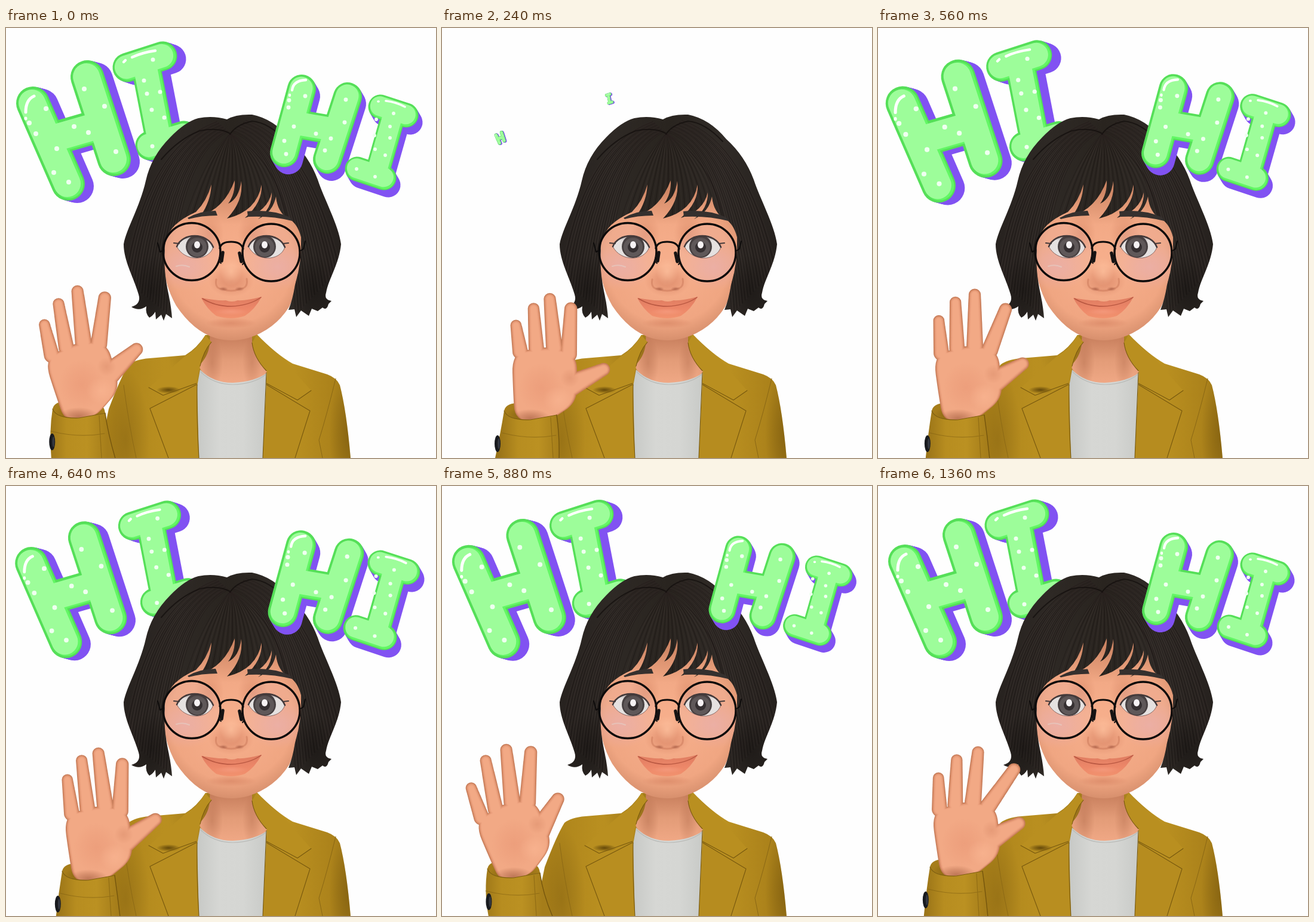
Write an HTML page with a canvas that moves like this. It is 720 px wide and 720 px high and loops after 1440 ms.

```html
<!DOCTYPE html>
<html lang="en">
<head>
<meta charset="utf-8">
<title>Hi</title>
<style>
html, body { margin: 0; width: 100%; height: 100%; overflow: hidden; background: #fefefe; }
canvas { display: block; width: 100vmin; height: 100vmin; }
</style>
</head>
<body>
<canvas id="stage" width="720" height="720"></canvas>
<script>
const ctx = document.getElementById('stage').getContext('2d');
const LOOP = 1440, STEP = 80;
const lerp = (a, b, k) => a + (b - a) * k;

// Linear interpolation through rows of [time, ...values].
function sample(keys, t) {
  let i = 0;
  while (i < keys.length - 2 && t >= keys[i + 1][0]) i++;
  const a = keys[i], b = keys[i + 1];
  const k = Math.max(0, Math.min(1, (t - a[0]) / (b[0] - a[0])));
  return a.slice(1).map((v, n) => lerp(v, b[n + 1], k));
}

function fill(shape, color) {
  ctx.fillStyle = color;
  ctx.fill(typeof shape === 'string' ? new Path2D(shape) : shape);
}

function line(shape, color, width = 1) {
  ctx.strokeStyle = color;
  ctx.lineWidth = width;
  ctx.stroke(typeof shape === 'string' ? new Path2D(shape) : shape);
}

function disc(x, y, rx, ry, color) {
  ctx.beginPath();
  ctx.ellipse(x, y, rx, ry, 0, 0, 7);
  ctx.fillStyle = color;
  ctx.fill();
}

function glow(x, y, rx, ry, rgb, alpha) {
  ctx.save();
  ctx.translate(x, y);
  ctx.scale(rx, ry);
  const g = ctx.createRadialGradient(0, 0, 0, 0, 0, 1);
  g.addColorStop(0, `rgba(${rgb},${alpha})`);
  g.addColorStop(0.5, `rgba(${rgb},${alpha * 0.55})`);
  g.addColorStop(1, `rgba(${rgb},0)`);
  disc(0, 0, 1, 1, g);
  ctx.restore();
}

function within(shape, paint) {
  ctx.save();
  ctx.clip(shape);
  paint();
  ctx.restore();
}

function linear(x0, y0, x1, y1, ...colors) {
  const g = ctx.createLinearGradient(x0, y0, x1, y1);
  colors.forEach((c, i) => g.addColorStop(i / (colors.length - 1), c));
  return g;
}

// ---- Bubble letters -------------------------------------------------
// cast is the direction of the purple side
const letters = {
  leftH: {
    center: [122, 173], width: 56, from: [-22, 11], cast: [15, 4],
    body: 'M47 126L106 261M138 82L183 220M80 186L160 163',
    shine: 'M35 141Q35 120 49 114M35 151L35 152',
    dots: [[41, 159], [69, 135], [52, 177], [87, 202], [82, 242], [107, 258], [116, 165], [133, 102], [167, 131], [140, 175], [186, 207]]
  },
  leftI: {
    center: [242, 120], width: 49, from: [39, -2], cast: [15, 5],
    body: 'M205 66L264 47M235 58L259 182M243 197L300 180',
    shine: 'M213 49Q230 41 252 38M199 57L202 54',
    dots: [[248, 53], [238, 110], [260, 107], [246, 137], [267, 150], [247, 198], [233, 88]]
  },
  rightH: {
    center: [522, 161], width: 48, from: [2, 7], cast: [7, 12],
    body: 'M497 102L468 209M574 115L540 220M485 160L555 172',
    shine: 'M481 104Q483 88 504 87M477 112L477 113',
    dots: [[476, 121], [475, 133], [503, 114], [484, 165], [468, 189], [471, 211], [521, 177], [571, 120], [569, 158], [546, 185], [536, 205]]
  },
  rightI: {
    center: [632, 198], width: 41, from: [1, 1], cast: [7, 12],
    body: 'M629 132L672 146M651 145L624 240M590 236L635 251',
    shine: 'M638 122Q655 124 670 132M625 123L626 123',
    dots: [[651, 143], [622, 153], [645, 165], [619, 180], [645, 184], [620, 203], [637, 213], [589, 236], [620, 249]]
  }
};

// age, scale, drift from the resting place
const popKeys = [
  [0, 0.1, 1], [80, 0.6, 0.5], [160, 1.015, 0.06], [240, 1.045, 0], [320, 1.02, 0.1],
  [400, 0.975, 0.2], [480, 0.945, 0.12], [560, 0.97, 0.06], [640, 0.995, 0.03], [720, 1, 0]
];

function drawLetter({ center: [cx, cy], width, body, shine, dots, from, cast }, age) {
  if (age < 0) return;
  const [scale, drift] = sample(popKeys, age);
  const shape = new Path2D(body);
  const layer = (k, color, w) => {
    ctx.save();
    ctx.translate(cast[0] * k, cast[1] * k);
    line(shape, color, w);
    ctx.restore();
  };
  ctx.save();
  ctx.translate(cx - 2 + from[0] * drift, cy + from[1] * drift);
  ctx.scale(scale, scale);
  ctx.translate(-cx, -cy);
  const depth = width / 56;
  for (let i = 1; i <= 6; i++) layer(i / 6, '#8152f2', width);
  layer(0, '#55df58', width);
  layer(0.1, '#63f765', width - 8 * depth);
  layer(-0.1, '#9dfd9a', width - 11 * depth);
  dots.forEach(([x, y]) => disc(x, y, 4 * depth, 4 * depth, '#effff0'));
  line(shine, '#fff', 5 * depth);
  ctx.restore();
}

function drawWord(names, start, t) {
  names.forEach(n => drawLetter(letters[n], t === 0 ? LOOP : t - start));
}

// ---- Clothes ----------------------------------------------------------
const jacket = new Path2D('M334 514Q320 536 300 548L240 553Q216 555 205 564Q192 585 172 638L155 720H577Q570 640 559 598Q554 586 538 580L480 562Q452 546 420 513Z');
const neck = new Path2D('M342 500L341 530Q338 552 322 566Q345 604 380 602Q420 602 438 574Q417 555 412 525V500Z');

function drawBody() {
  fill(jacket, linear(160, 0, 577, 0, '#a98019', '#b98f20', '#b48b1f', '#bb9121', '#a57c18'));
  within(jacket, () => {
    glow(365, 545, 95, 60, '80,55,5', 0.35);
    glow(200, 690, 40, 120, '90,62,8', 0.25);
    glow(575, 680, 34, 110, '80,55,5', 0.35);
  });
  fill(neck, linear(0, 518, 0, 595, '#c9805e', '#e39c78', '#f0a885'));
  glow(345, 560, 18, 45, '150,80,50', 0.3);
  glow(412, 560, 16, 45, '150,80,50', 0.25);
  fill('M325 572Q346 594 380 594Q418 592 437 577L430 720H323L320 600Z',
    linear(318, 0, 437, 0, '#c6c8c5', '#d6d7d4', '#d5d6d3', '#c8cac7'));
  line('M326 576Q348 597 380 597Q416 596 435 580', '#b9bbb8', 1.2);

  fill('M334 514Q320 538 300 549L239 602L263 615L319 594L326 562Q331 540 344 526Z', '#b98f20');
  fill('M420 513Q444 540 462 551L511 607L488 623L436 594L437 575Q415 552 412 527Z', '#b98f20');
  fill('M319 597L241 637L272 720H323Q320 650 319 597Z', '#b88e20');
  fill('M436 597L509 641L484 720H430Z', '#b68c1f');
  glow(272, 606, 20, 6, '65,43,0', 0.7);
  const seams = ['M239 602L263 615L319 595', 'M319 597L241 637L272 720', 'M511 607L488 623L436 595',
    'M436 597L509 641L484 720', 'M320 597Q319 650 323 720', 'M436 577L430 720',
    'M325 566Q331 540 344 526', 'M436 574Q415 552 412 527'];
  seams.forEach(s => line(s, '#77580e', 1.1));
  line('M552 587Q538 645 524 690L530 720', '#8a6714');
  line('M197 598Q205 660 218 720', '#8d6a15');
}

// ---- Head -------------------------------------------------------------
const face = new Path2D('M262 300V385Q265 430 285 465Q313 507 350 519Q378 527 406 519Q450 505 474 467Q492 430 495 385V300Q450 230 378 232Q300 232 262 300Z');
const hair = new Path2D('M370 153Q346 146 322 151Q300 157 275 183Q243 215 234 256C224 300 202 335 197 362C197 390 214 418 222 446Q227 462 210 467Q223 475 235 466Q233 478 240 485Q246 482 250 475L251 488L260 480L264 490L268 479L278 486Q277 470 273 450Q263 405 266 374Q264 350 283 330Q296 318 318 308Q336 290 344 262Q343 290 326 314Q365 303 383 255Q384 278 372 294Q390 286 394 256Q398 290 370 319Q420 307 428 262Q430 292 400 318Q438 307 445 275Q446 302 422 320Q447 308 452 282Q455 310 473 319Q488 327 494 350Q496 390 484 430Q480 455 473 472L483 471L486 484L494 473L507 482L512 470L522 474L530 468Q537 474 540 462L545 457Q532 455 536 443C540 420 558 395 561 362C557 330 532 285 522 254Q507 214 476 186Q448 152 412 145Q385 144 370 153Z');

function strand(x0, y0, cx, cy, x1, y1, i) {
  line(`M${x0} ${y0}Q${cx} ${cy} ${x1} ${y1}`, i % 2 ? 'rgba(66,59,53,.3)' : 'rgba(17,13,11,.3)', 1 + i % 3 * 0.4);
}

function drawHair() {
  fill(hair, linear(197, 0, 561, 0, '#27221f', '#2e2925', '#29241f', '#302b27', '#26211e'));
  within(hair, () => {
    for (let i = 0; i < 34; i++) {
      const k = i / 33;
      strand(372 - 20 * k, 174 - 18 * k, lerp(285, 232, k), lerp(215, 200, k), lerp(273, 198, k), lerp(480, 420, k), i);
      strand(378 + 25 * k, 174 - 20 * k, lerp(470, 510, k), lerp(205, 190, k), lerp(485, 560, k), lerp(480, 400, k), i);
      strand(376, 176, lerp(330, 455, k), 220, lerp(298, 478, k), 325, i);
    }
    line('M375 178Q385 162 412 156Q440 158 470 190', 'rgba(18,14,12,.7)', 2);
    line('M374 176Q355 166 325 172Q290 185 260 220', 'rgba(18,14,12,.7)', 2);
    glow(245, 440, 40, 60, '8,6,5', 0.35);
    glow(515, 440, 40, 60, '8,6,5', 0.35);
  });
}

function drawEye(x, irisX, side, open) {
  const y = 368;
  if (open < 0.12) {
    glow(x, y - 8, 42, 26, '165,100,75', 0.5);
    line(`M${x - 33} ${y + 2}Q${x} ${y + 14} ${x + 29} ${y + 6}`, '#241d1b', 3);
    line(`M${x + side * 29} ${y + 4}L${x + side * 35} ${y + 1}`, '#241d1b', 2.2);
    return;
  }
  const top = lerp(y + 14, y - 26, open);
  const lid = `M${x - 31} ${y - 2}C${x - 22} ${top} ${x + 20} ${top} ${x + 30} ${y - 1}`;
  const outline = new Path2D(`${lid}C${x + 22} ${y + 23} ${x - 18} ${y + 24} ${x - 31} ${y - 2}Z`);
  fill(outline, '#e5e4e1');
  within(outline, () => {
    disc(irisX, 366, 19, 19, '#2f2c2b');
    disc(irisX, 367, 16, 16, '#4b4746');
    disc(irisX, 367, 9, 9, '#1a1818');
    disc(irisX, 363, 5, 6, '#f8f8f8');
    glow(x, y - 22, 34, 12, '40,30,28', 0.4);
  });
  line(outline, 'rgba(80,45,38,.7)', 1);
  line(lid, '#2b2422', 2.6);
  line(`M${x + side * 27} ${y - 7}L${x + side * 36} ${y - 8}`, '#2b2422', 2);
}

function drawFace(open) {
  const skin = ctx.createRadialGradient(378, 400, 20, 378, 385, 148);
  skin.addColorStop(0, '#f6ae8b');
  skin.addColorStop(0.65, '#f0a682');
  skin.addColorStop(1, '#cf8866');
  fill(face, skin);
  within(face, () => {
    glow(378, 275, 110, 55, '150,80,50', 0.3);
    glow(300, 400, 50, 40, '232,172,172', 0.6);
    glow(455, 400, 50, 40, '232,172,172', 0.6);
    glow(340, 345, 25, 35, '190,105,75', 0.3);
    glow(413, 345, 25, 35, '190,105,75', 0.3);
  });
  // nose
  glow(377, 424, 38, 26, '200,108,78', 0.5);
  glow(377, 408, 18, 24, '255,195,160', 0.7);
  line('M352 421Q349 437 363 437Q377 443 391 437Q406 436 403 420', 'rgba(180,92,64,.3)', 3);
  glow(364, 437, 8, 4, '120,50,35', 0.35);
  glow(391, 437, 8, 4, '120,50,35', 0.35);
  // mouth
  glow(377, 494, 42, 9, '190,100,70', 0.35);
  fill('M327 452Q355 457 368 456Q378 460 388 456Q402 457 428 450Q417 471 400 482Q377 490 352 482Q336 470 327 452Z', linear(0, 450, 0, 487, '#de7c60', '#ec8668', '#f2936f'));
  line('M329 453Q350 466 377 466Q407 465 427 451', 'rgba(169,72,52,.75)', 1.5);
  glow(377, 475, 28, 6, '255,175,150', 0.35);
}

function drawBrows(open) {
  ctx.save();
  ctx.translate(0, (1 - open) * 11);
  fill('M304 318Q325 306 351 306L354 314Q326 314 306 320Z', '#35302e');
  fill('M404 307Q444 303 476 317L479 323Q445 314 405 316Z', '#35302e');
  ctx.restore();
}

function drawGlasses() {
  [[311, 374.5], [444, 376]].forEach(([x, y]) => {
    disc(x, y, 47, 47, 'rgba(232,200,215,.13)');
    ctx.beginPath();
    ctx.arc(x, y, 48, 0, 7);
    ctx.strokeStyle = '#0d0b0b';
    ctx.lineWidth = 3.4;
    ctx.stroke();
  });
  line('M358 369Q360 358 377 358Q394 358 397 370', '#0d0b0b', 3.2);
  line('M363 376L361 390M391 377L394 391', '#161313', 5.5);
  line('M361 378Q353 389 360 394M393 379Q401 391 396 396', '#161313', 2);
  line('M254 360L258 375L264 372M501 357L498 370L493 373', '#0d0b0b', 2);
  line('M285 399Q296 395 307 400', 'rgba(225,225,220,.4)', 2);
}

// ---- Waving hand --------------------------------------------------------
// time, wrist x, y, tilt, then tips: little, ring, middle, index, thumb
const hi = [122, 645, -16, 63, 491, 87, 456, 119, 435, 166, 446, 223, 534];
const upright = [148, 648, 0, 123, 492, 153, 464, 180, 448, 216, 464, 276, 569];
const leaning = [140, 638, 5, 157, 468, 194, 447, 229, 448, 273, 491, 265, 580];
const easing = [131, 645, -6, 101, 483, 132, 453, 168, 440, 231, 470, 241, 562];
const center = [138, 652, -6, 102, 486, 126, 454, 154, 442, 195, 460, 255, 555];
const outward = [120, 648, -21, 47, 500, 72, 454, 107, 436, 149, 440, 197, 519];
const waveKeys = [
  [0, ...hi], [240, ...upright], [400, ...leaning], [500, ...easing], [640, ...center],
  [880, ...outward], [1120, ...upright], [1280, ...leaning], [1360, ...easing]
];
const knuckles = [[-17, -106], [10, -111], [40, -112], [64, -102], [58, -45]];

function drawHand(t) {
  const [wx, wy, tilt, ...tips] = sample(waveKeys, t);
  const a = tilt * Math.PI / 180, cos = Math.cos(a), sin = Math.sin(a);
  const place = ([x, y]) => [wx + x * cos - y * sin, wy + x * sin + y * cos];
  const base = knuckles.map(place);
  const shift = -tilt * 0.8;

  // sleeve with its opening behind the wrist
  const rimLine = `M${wx - 44} ${wy - 7}Q${wx - 38} ${wy + 9} ${wx} ${wy + 8}L${wx + 44} ${wy}`;
  const sleeve = new Path2D(`${rimLine}Q${wx + 49} ${wy + 35} ${wx + 48 + shift} 720H${wx - 59 + shift}Q${wx - 50} ${wy + 30} ${wx - 44} ${wy - 7}Z`);
  fill(`${rimLine}Q${wx + 42} ${wy - 18} ${wx + 25} ${wy - 14}L${wx - 25} ${wy - 20}Q${wx - 42} ${wy - 18} ${wx - 44} ${wy - 7}Z`, '#a67d1a');
  glow(wx, wy, 40, 16, '80,55,5', 0.5);

  const hand = inset => {
    const p = new Path2D();
    base.forEach(([bx, by], i) => {
      const tx = tips[i * 2], ty = tips[i * 2 + 1];
      const len = Math.hypot(bx - tx, by - ty);
      const r0 = [9, 9.5, 10, 10.5, 10][i], r1 = [13, 13, 14, 14, 20][i];
      for (let n = 0; n <= 40; n++) {
        const k = lerp(6 / len, 1, n / 40);
        const x = lerp(tx, bx, k), y = lerp(ty, by, k), r = lerp(r0, r1, k) - inset;
        p.moveTo(x + r, y);
        p.arc(x, y, r, 0, 7);
      }
    });
    const rim = [[-26 + inset, 10], [-29 + inset, -40], [-31 + inset, -102], [8, -112 + inset], [40, -114 + inset],
      [77 - inset, -100], [79 - inset, -58], [76 - inset, -20], [42 - inset, 3], [24 - inset, 12]].map(place);
    const mid = (u, v) => [(u[0] + v[0]) / 2, (u[1] + v[1]) / 2];
    const last = rim.length - 1;
    p.moveTo(...mid(rim[last], rim[0]));
    rim.forEach((q, i) => p.quadraticCurveTo(...q, ...mid(q, rim[(i + 1) % rim.length])));
    return p;
  };
  ['#c77d5a', '#d98d69', '#e79b77', '#eea380', '#f2a985'].forEach((c, i) => fill(hand(i * 1.3), c));
  const crease = place([66, -62]), heel = place([18, -45]), thumb = place([46, -26]);
  glow(...crease, 16, 16, '185,100,68', 0.2);
  glow(...heel, 38, 42, '225,135,103', 0.3);
  glow(...thumb, 25, 22, '255,190,155', 0.4);
  within(hand(0), () => glow(wx, wy + 6, 34, 16, '140,70,42', 0.5));

  fill(sleeve, linear(wx - 55, 0, wx + 48, 0, '#987217', '#b78d20', '#bb9122', '#a57d1a'));
  line(rimLine, '#806010', 1.2);
  line(`M${wx + 44} ${wy}Q${wx + 49} ${wy + 35} ${wx + 48 + shift} 720`, '#74550d', 1.4);
  line(`M${wx - 47} ${wy + 30}Q${wx} ${wy + 42} ${wx + 43} ${wy + 34}M${wx + 34} ${wy + 4}L${wx + 38} 720`, 'rgba(120,88,15,.5)', 1.2);
  disc(wx - 55 + shift * 0.8, wy + 48, 5, 14, '#181a1e');
  disc(wx - 53 + shift * 0.8, wy + 48, 2, 9, '#343840');
}

const lidKeys = [[0, 1], [960, 1], [1040, 0.5], [1120, 0], [1200, 0.35], [1280, 0.8], [1360, 0.95]];

function draw(t) {
  ctx.lineCap = ctx.lineJoin = 'round';
  ctx.fillStyle = '#fefefe';
  ctx.fillRect(0, 0, 720, 720);
  const [open] = sample(lidKeys, t);
  drawWord(['leftI', 'leftH'], 240, t);
  drawBody();
  drawFace(open);
  drawHair();
  drawBrows(open);
  drawEye(317, 320, -1, open);
  drawEye(437, 433, 1, open);
  drawGlasses();
  drawWord(['rightH', 'rightI'], 400, t);
  drawHand(t);
}

const start = performance.now();
function tick() {
  const elapsed = (performance.now() - start) % LOOP;
  draw(Math.floor(elapsed / STEP) * STEP);
  requestAnimationFrame(tick);
}
tick();
</script>
</body>
</html>
```
